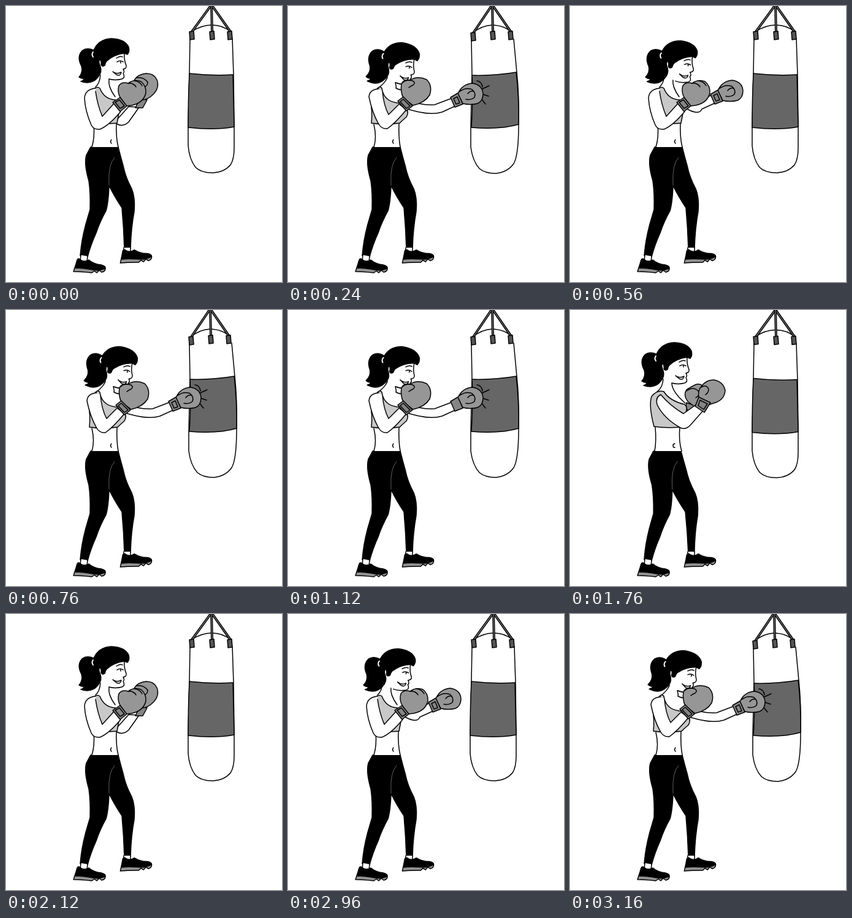
Write an HTML page that moves like this. It is 450x450 px and loops after 3200 ms.

```html
<!DOCTYPE html>
<html lang="en">
<head>
<meta charset="utf-8">
<title>Boxing practice</title>
<style>
  html, body { margin: 0; width: 100%; height: 100%; overflow: hidden; background: #fff; }
  svg { display: block; width: 100%; height: 100%; }
  path { stroke: #000; stroke-width: 1.5; stroke-linejoin: round; stroke-linecap: round; }
</style>
</head>
<body>
<svg id="stage" viewBox="0 0 450 450"></svg>
<script>
const path = (d, fill = 'none', extra = '') => `<path d="${d}" fill="${fill}" ${extra}/>`;
const group = (content, transform = '') => `<g transform="${transform}">${content}</g>`;
const bare = 'style="stroke:none"';
const GLOVE = '#969696', CUFF = '#858585', BRA = '#c8c8c8', BAND = '#666', SOLE = '#929292';

// Punching bag
const strap = (x1, y1, x2, y2) =>
  path(`M${x1} ${y1}L${x2} ${y2}`, 'none', 'style="stroke-width:4;stroke-linecap:butt"') +
  path(`M${x1} ${y1}L${x2} ${y2}`, 'none', 'style="stroke:#777;stroke-width:1.3"');
const clip = (x, y) => path(`M${x} ${y}l7 -1l1 13l-7 1Z`, '#555');

const restBag = path('M300 53L299 110L297 198V228Q299 250 309 263Q318 272 337 272Q356 271 366 259Q372 250 372 231V197L371 112L369 53', '#fff') +
  path('M299 110Q335 114 370 112Q371 160 372 197Q340 203 297 198Q297 150 299 110Z', BAND) +
  path('M302 42Q319 31 335 31Q354 31 366 42') +
  strap(335, -2, 303, 42) + strap(335, -2, 366, 42) + strap(335, -2, 336, 42) +
  clip(299, 42) + clip(332, 42) + clip(361, 42);

const hitBag = path('M299 55L300 112L298 198V230Q301 253 312 265Q321 273 339 273Q358 271 368 257Q376 243 376 194Q377 145 373 108L368 54', '#fff') +
  path('M300 113Q337 114 372 108Q377 150 376 193Q345 202 299 198Q302 155 300 113Z', BAND) +
  path('M301 44Q315 32 333 31Q354 32 364 43') +
  strap(333, -2, 302, 44) + strap(333, -2, 364, 43) + strap(333, -2, 334, 42) +
  clip(298, 44) + clip(330, 42) + clip(359, 42) +
  path('M308 122Q316 123 317 132M317 135L328 130M318 144L327 147M315 151L322 160');

// Legs and shoes
const legs = path('M138 230H183Q187 246 191 260Q195 280 205 298Q211 312 209 335Q204 362 203 395L193 396Q192 362 189 329Q178 313 168 293Q167 321 163 334Q153 352 147 370Q138 390 133 409L121 407Q123 382 130 356L137 332Q138 306 135 285Q127 258 131 243Z', '#000') +
  path('M177 247Q166 258 168 292', 'none', 'style="stroke:#777;stroke-width:.8"');
const shoe = path('M5 -16Q7 -20 11 -16Q17 -12 24 -16Q33 -9 44 -8Q52 -6 51 -2Q40 3 30 0Q14 -3 1 -3Q3 -9 5 -16Z', '#000') +
  path('M1 -3Q14 -3 30 0Q40 2 51 -2Q51 3 45 4L41 1L37 5L33 2L29 5Q12 3 -1 3Z', SOLE);
const feet = path('M122 406L121 417H132L133 408M192 394L192 404L203 402V394', '#fff') +
  group(shoe, 'translate(111 430)') + group(shoe, 'translate(187 416) rotate(-6)');

// Head
const head = path('M153 82Q174 72 193 76Q192 88 196 97Q197 102 191 103Q194 108 191 110Q195 117 189 119Q178 122 168 119L154 112Z', '#fff', bare) +
  path('M193 76Q192 88 196 97Q197 102 191 103Q194 108 191 110Q195 117 189 119Q178 122 168 119') +
  path('M143 72Q151 54 172 53Q194 54 200 67Q202 74 198 79L193 77Q176 79 164 90Q162 92 161 97Q157 100 155 96Q156 90 153 87Q150 91 154 99Q157 108 150 116Q140 129 122 123Q126 122 128 118Q123 119 119 116Q126 108 123 98Q115 83 124 73Q132 67 143 72Z', '#000') +
  path('M142 75Q139 79 142 83', 'none', 'style="stroke:#fff;stroke-width:2"') +
  path('M180 85Q186 81 190 83M181 91Q186 88 191 91M187 90V93M174 107Q181 112 188 108Q187 115 180 112Z');

// Torsos
const navel = path('M172 218Q169 221 172 224');
const torsos = {
  guard: path('M154 106Q154 126 146 132L140 150L143 193Q145 214 140 230H183Q179 214 180 190L178 148Q166 136 168 117Z', '#fff', bare) +
    path('M154 112Q153 126 146 132M168 119Q166 132 178 148M143 193Q145 214 140 230M180 190Q179 214 183 230') + navel +
    path('M145 134Q149 131 153 134Q160 152 178 153Q187 157 185 170L181 191Q161 193 144 189L138 150Z', BRA),
  lean: path('M162 112Q158 128 148 133L136 160L140 193Q145 214 140 230H183Q179 214 181 192L190 158L176 135Z', '#fff', bare) +
    path('M163 115Q158 126 148 133M175 125Q177 132 176 134Q181 137 187 137M140 193Q145 214 140 230M181 190Q180 214 183 230') + navel +
    path('M146 134Q150 130 153 134Q156 155 178 158Q187 158 192 164Q198 173 193 181Q188 185 182 191Q158 194 136 191Q138 172 134 150Z', BRA),
  cross: path('M152 106Q151 126 144 132L132 150L139 192Q140 212 138 230H182Q178 213 179 190L187 154L168 119Z', '#fff', bare) +
    path('M152 112Q151 127 142 133M166 119Q166 133 188 152M139 191Q141 214 138 230M179 191Q177 214 182 230M171 218Q168 218 168 221Q168 225 171 224') +
    path('M133 141Q142 130 153 133Q162 148 187 154Q193 159 188 169L180 191Q157 193 137 190Q128 156 133 141Z', BRA)
};

// Arms
const cuff = (d, inner) => path(d, CUFF) + path(inner);
const fist = path('M277 143Q284 127 301 126Q317 129 318 143Q318 155 309 159Q297 162 285 159Z', GLOVE) +
  path('M279 140Q289 132 300 136Q307 142 304 149Q298 154 290 152M293 143Q297 138 302 139') +
  cuff('M265 149L277 142L285 160L272 165Z', 'M270 151L276 148L280 158L274 160Z');
const plainFist = fist.replace('M270 151L276 148L280 158L274 160Z', '');

const farPunch = (dx, dy = 0, glove = fist) =>
  path(`M190 152Q220 163 ${239 + dx} ${161 + dy}L${268 + dx} ${150 + dy}L${273 + dx} ${163 + dy}L${251 + dx} ${173 + dy}Q${228 + dx / 2} 180 186 165`, '#fff') +
  group(glove, `translate(${dx} ${dy})`);
const nearPunch = (dx, dy = 0) =>
  path(`M148 138Q172 161 ${220 + dx} ${160 + dy}L${268 + dx} ${150 + dy}L${273 + dx} ${163 + dy}L${248 + dx} ${173 + dy}Q${205 + dx / 2} 183 172 176Q137 162 142 143Q144 139 148 138`, '#fff') +
  group(fist, `translate(${dx} ${dy})`);

const far = {
  guard: path('M183 183L200 164L217 165L200 189Q191 198 180 192', '#fff') +
    path('M218 151L230 153L223 166L211 166Z', CUFF) +
    path('M209 121Q215 111 229 110Q241 110 246 120Q251 134 239 145Q231 153 222 153Q213 140 209 121Z', GLOVE) +
    path('M213 117Q224 115 231 124Q231 130 226 132'),
  cross: path('M180 187L188 193L198 166L188 161Z', '#fff') +
    path('M190 151L204 156L193 167L189 158Z', CUFF) +
    path('M192 149Q184 139 190 130Q198 125 202 123Q210 118 217 124L224 150L205 159Z', GLOVE) +
    path('M190 132Q201 124 209 132Q213 139 205 143')
};
const near = {
  guard: path('M146 134Q129 136 128 150Q129 171 139 194Q143 202 153 201Q168 195 187 172L176 159L157 180Q149 161 146 139', '#fff') +
    path('M186 149Q181 139 184 130Q189 123 199 126Q209 119 220 123Q229 130 228 142Q224 158 205 162L196 163Z', GLOVE) +
    path('M199 126Q208 125 212 132M210 122Q218 123 222 130') +
    cuff('M174 157L186 149L197 163L186 172Z', 'M178 157L185 153L193 163L186 167Z'),
  lean: path('M148 135Q133 136 132 148Q137 173 147 191Q152 201 162 200Q176 190 193 169L181 160L164 177Q156 162 154 139', '#fff') +
    path('M188 150Q183 139 185 127Q189 119 199 121Q211 113 226 120Q236 130 231 145Q223 158 204 162Z', GLOVE) +
    path('M187 125Q193 119 203 122Q209 125 204 129Q199 131 197 133') +
    cuff('M179 155L188 148L203 163L193 171Z', 'M183 156L188 152L199 163L193 167Z'),
  cross: path('M148 138Q163 156 185 169L206 154L218 163L196 188Q188 196 180 192Q152 176 142 154Q139 142 148 138', '#fff') +
    path('M210 143Q208 131 214 125Q222 113 235 114Q250 117 253 131Q252 146 237 151L228 154Z', GLOVE) +
    path('M212 127Q222 120 226 129Q226 135 221 138') +
    cuff('M210 142L229 151L219 167L204 157Z', 'M212 147L224 153L218 162L209 156Z')
};

// Poses
const leanHead = 'translate(8 -1) rotate(8 119 117)';
const lunge = 'translate(16.1) skewX(-4)';
const swing = 'rotate(-11 334 0)';
const pose = ({ bag = restBag, bagMove, headMove, torso = 'guard', back, front, upper, legMove }) =>
  group(bag, bagMove) +
  group(back, upper) + group(legs, legMove) + feet +
  group(torsos[torso] + group(head, headMove) + front, upper);

const hit = { bag: hitBag, headMove: leanHead, torso: 'lean', front: near.lean };
const crossed = { torso: 'cross', back: far.cross, headMove: 'translate(-2)', bagMove: 'translate(0 1.5)', legMove: 'translate(-4.55) skewX(.636)' };
const crossHit = { ...crossed, bag: hitBag, bagMove: '', headMove: leanHead, front: nearPunch(0) };

const poses = {
  guard: pose({ back: far.guard, front: near.guard }),
  reach: pose({ back: farPunch(-36, -5), front: near.guard, headMove: 'translate(4) rotate(4 119 117)' }),
  contact: pose({ ...hit, back: farPunch(0, 0, plainFist) }),
  impact: pose({ ...hit, back: farPunch(15), upper: lunge, bagMove: swing }),
  recoil: pose({ ...hit, back: farPunch(0) }),
  cross: pose({ ...crossed, front: near.cross }),
  crossReach: pose({ ...crossed, front: nearPunch(-36, -5), headMove: 'translate(2) rotate(4 119 117)' }),
  crossContact: pose(crossHit),
  crossImpact: pose({ ...crossHit, front: nearPunch(15), upper: lunge, bagMove: swing })
};

const jab = start => [
  [start, 'reach'], [start + 80, 'contact'], [start + 120, 'impact'],
  [start + 200, 'recoil'], [start + 240, 'reach'], [start + 280, 'guard']
];
const LOOP = 3200;
const steps = [
  [0, 'guard'], ...jab(40), ...jab(560), ...jab(1040),
  [1760, 'cross'], [1800, 'crossReach'], [1880, 'crossContact'], [1920, 'crossImpact'],
  [2000, 'crossContact'], [2040, 'crossReach'], [2080, 'cross'], [2120, 'guard'],
  ...jab(2960).filter(([time]) => time < LOOP)
];

const stage = document.getElementById('stage');
stage.innerHTML = Object.entries(poses)
  .map(([name, content]) => `<g id="${name}" display="none">${content}</g>`).join('');
let shown;
const startTime = performance.now();

function draw(now) {
  const time = Math.max(0, now - startTime) % LOOP;
  const name = steps.findLast(([start]) => start <= time)[1];
  if (name !== shown) {
    if (shown) document.getElementById(shown).setAttribute('display', 'none');
    document.getElementById(name).removeAttribute('display');
    shown = name;
  }
  requestAnimationFrame(draw);
}
draw(startTime);
</script>
</body>
</html>
```
